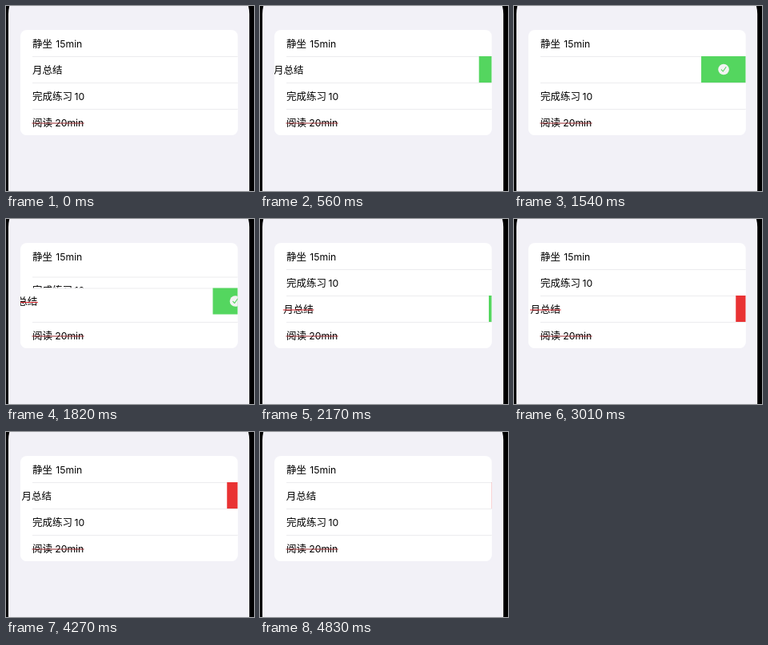
Animation, 310 px wide and 232 px high, one loop 4900 ms. Source, as an HTML page:

```html
<!DOCTYPE html>
<html lang="zh-CN">
<head>
<meta charset="utf-8">
<style>
  html, body { margin: 0; height: 100%; overflow: hidden; background: #000; }
  svg { display: block; width: 100vw; height: 100vh; }
  text { font: 12.5px Inter, "Noto Sans CJK SC", "Noto Sans CJK", sans-serif; }
  tspan { font-size: 12.2px; }
  .line { fill: #ececee; }
  .icon { fill: none; stroke-width: 1.1; stroke-linecap: round; stroke-linejoin: round; }
</style>
</head>
<body>
<svg viewBox="0 0 310 232">
  <defs>
    <clipPath id="card"><rect x="18" y="30" width="271.7" height="132" rx="8"/></clipPath>
    <g id="cell">
      <rect x="18" width="272" height="33" fill="#fff"/>
      <rect class="line" x="33" width="257" height="1"/>
    </g>
  </defs>
  <rect x="3" y="-30" width="301.2" height="300" rx="40" fill="#f2f1f7"/>
  <g clip-path="url(#card)">
    <rect x="18" y="30" width="272" height="132" fill="#fff"/>
    <text x="33" y="51.5">静坐<tspan x="62.3">15min</tspan></text>
    <g transform="translate(0 129)">
      <use href="#cell"/>
      <text x="33" y="21.5">阅读<tspan x="61.3">20min</tspan></text>
      <rect x="32.5" y="17.5" width="65" height="1" fill="#98282c"/>
    </g>
    <g id="next">
      <use href="#cell"/>
      <text x="33" y="21.5">完成练习<tspan x="85.5">10</tspan></text>
    </g>
    <g id="task">
      <use href="#cell"/>
      <g id="label">
        <text x="33" y="21.5">月总结</text>
        <rect id="strike" x="32.5" y="17.5" width="38.5" height="1" fill="#dc2028"/>
      </g>
      <rect id="button" height="33"/>
      <g id="badge">
        <circle r="6.8" fill="#f3f3f3"/>
        <path id="check" class="icon" stroke="#54d65f" d="M-2.8 .3L-.8 2.5L2.9 -2.8"/>
        <path id="undo" class="icon" stroke="#e93233" d="M-1 -3.6L-3 -1.6L-1 .4M-3 -1.6H1a2.2 2.2 0 0 1 0 4.4H-.6"/>
      </g>
    </g>
  </g>
</svg>
<script>
const LOOP = 4900, OPEN = 56, RIGHT = 289.7;
const DONE = 1640, UNDONE = 3940;
const $ = id => document.getElementById(id);
const set = (id, name, value) => $(id).setAttribute(name, value);
const show = (id, on) => set(id, 'visibility', on ? 'visible' : 'hidden');
const clamp = x => Math.min(1, Math.max(0, x));
const smooth = x => x * x * (3 - 2 * x);

// Critically damped spring, from 1 towards 0
const spring = (t, rate) => {
  const x = Math.max(0, t) * rate;
  return (1 + x) * Math.exp(-x);
};

// Width of the revealed button
function swipe(t) {
  if (t < 560) return 0;
  if (t < DONE) return OPEN - 40 * spring(t - 620, 0.0074);
  if (t < 2970) return OPEN * spring(t - DONE, 0.0083);
  if (t < 3500) return 58 * (1 - (1 - (t - 2970) / 530) ** 3);
  if (t < UNDONE) return OPEN + 2 * spring(t - 3500, 0.015);
  return OPEN * spring(t - UNDONE, 0.0083);
}

function draw(now) {
  const t = now % LOOP;
  const w = swipe(t), left = RIGHT - w;
  const shift = 33 * (smooth(clamp((t - DONE) / 280)) - smooth(clamp((t - UNDONE) / 280)));
  const red = t >= 2900;
  set('task', 'transform', `translate(0 ${63 + shift})`);
  set('next', 'transform', `translate(0 ${96 - shift})`);
  set('label', 'transform', `translate(${-w} 0)`);
  set('button', 'x', left);
  set('button', 'width', w);
  set('button', 'fill', red ? '#e93233' : '#54d65f');
  set('badge', 'transform', `translate(${left + 28 + Math.max(0, w - OPEN)} 16.5)`);
  show('check', !red);
  show('undo', red);
  show('strike', t >= DONE && t < UNDONE);
  requestAnimationFrame(() => draw(performance.now() - start));
}
const start = performance.now();
draw(0);
</script>
</body>
</html>
```
